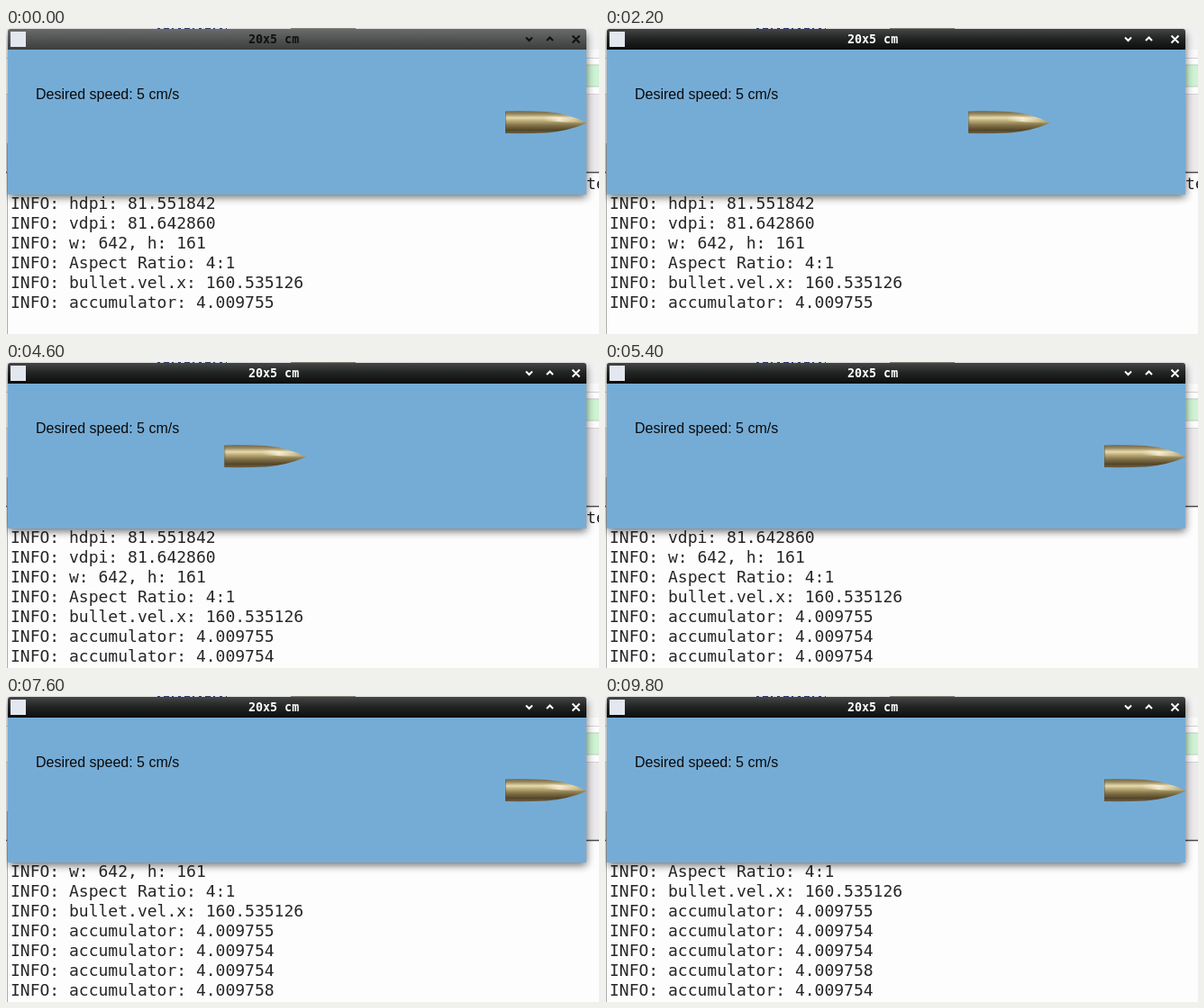
Recreate the animation shown at these times as an HTML page. Size 658 px wide and 340 px high, loop 10 s.

```html
<!DOCTYPE html>
<html lang="en">
<head>
<meta charset="utf-8">
<title>20x5 cm</title>
<style>
  html, body { margin: 0; width: 100%; height: 100%; overflow: hidden; background: #fdfdfd; }
  svg { display: block; width: 658px; height: 340px; }
  text { white-space: pre; }
  .term { font: 18px "DejaVu Sans Mono", monospace; fill: #262626; }
  .label { font: 16px "Liberation Sans", Arial, sans-serif; fill: #0a0a0a; }
  .title { font: bold 13.33px "DejaVu Sans Mono", monospace; }
</style>
</head>
<body>
<svg viewBox="0 0 658 340">
  <defs>
    <linearGradient id="active" x2="0" y2="1">
      <stop offset="0" stop-color="#454747"/>
      <stop offset=".45" stop-color="#242626"/>
      <stop offset="1" stop-color="#0b0c0c"/>
    </linearGradient>
    <linearGradient id="idle" x2="0" y2="1">
      <stop offset="0" stop-color="#6a6b6b"/>
      <stop offset=".5" stop-color="#525353"/>
      <stop offset="1" stop-color="#3c3d3d"/>
    </linearGradient>
    <linearGradient id="brass" x2="0" y2="1">
      <stop offset="0" stop-color="#6f6547"/>
      <stop offset=".14" stop-color="#9c8d61"/>
      <stop offset=".3" stop-color="#e6dbb0"/>
      <stop offset=".42" stop-color="#c2b17c"/>
      <stop offset=".62" stop-color="#85754b"/>
      <stop offset=".85" stop-color="#544628"/>
      <stop offset="1" stop-color="#6b5f45"/>
    </linearGradient>
    <linearGradient id="shine">
      <stop offset="0" stop-color="#fff8dc" stop-opacity="0"/>
      <stop offset=".4" stop-color="#fff8e4" stop-opacity=".75"/>
      <stop offset="1" stop-color="#d8ccb0" stop-opacity=".2"/>
    </linearGradient>
    <filter id="blur" x="-10%" y="-20%" width="120%" height="140%">
      <feGaussianBlur stdDeviation="5"/>
    </filter>
    <clipPath id="view"><rect x="2" y="24" width="642" height="161"/></clipPath>
  </defs>

  <!-- desktop behind the window -->
  <rect width="658" height="340" fill="#fdfdfd"/>
  <rect width="658" height="24" fill="#f1f1f2"/>
  <rect y="24" width="658" height="9" fill="#f9f9f9"/>
  <path d="M0 33.5H658M0 73.5H658" stroke="#d5d1d5"/>
  <rect x="600" y="41" width="70" height="24" fill="#cdf3d3" stroke="#bccfc0"/>
  <rect y="74" width="658" height="86" fill="#ebe9ec"/>
  <path d="M0 160.5H658" stroke="#4c4c4c" stroke-width="1.5"/>
  <path d="M1.5 128V340" stroke="#a9a9a9"/>
  <path d="M168 .8H245" stroke="#35407c" stroke-width="1.6" stroke-dasharray="3 4 6 3 2 5"/>
  <path d="M316 .8H388" stroke="#8b8d83" stroke-width="1.4"/>
  <g id="lines" class="term"></g>

  <!-- window -->
  <rect x="3" y="6" width="641" height="182" fill="#000" opacity=".58" filter="url(#blur)"/>
  <rect x="2" y="24" width="642" height="161" fill="#75acd6"/>
  <path id="bar" d="M2 24V4Q2 1 5 1H641Q644 1 644 4V24Z"/>
  <rect x="5" y="4" width="17" height="17" fill="#e3e7ef"/>
  <text id="title" class="title" x="269" y="17">20x5 cm</text>
  <path id="buttons" d="M577 10.5l3.5 3.5l3.5-3.5M600 14l3.5-3.5l3.5 3.5M628.5 8.5l8 8M636.5 8.5l-8 8" fill="none" stroke-width="2"/>
  <g clip-path="url(#view)">
    <text class="label" x="33" y="79">Desired speed: 5 cm/s</text>
    <g id="bullet">
      <path d="M0 92.5Q24 92 46 93Q70 95 90.5 105.5Q70 114.5 46 116.5Q24 117.5 0 117Z" fill="url(#brass)"/>
      <path d="M42 98Q66 97.5 88 105Q66 105 42 103Z" fill="url(#shine)"/>
      <path d="M.5 93V116.5" stroke="#5d5135" stroke-opacity=".5"/>
    </g>
  </g>
</svg>
<script>
  const LOOP = 10000, STEP = 200;
  const LENGTH = 90, START = 2 - LENGTH, REST = 554;
  const SPEED = 160.535126 * 2.5 / 1000; // px per ms
  const FOCUS = 600, ROWS = 7;
  const RUNS = [
    { at: 976, log: '4.009754' },
    { at: 3777, log: '4.009754' },
    { at: 5839, log: '4.009758' },
    { at: 8020, log: '4.009754' }
  ];
  const OUTPUT = ['hdpi: 81.551842', 'vdpi: 81.642860', 'w: 642, h: 161',
    'Aspect Ratio: 4:1', 'bullet.vel.x: 160.535126', 'accumulator: 4.009755'];

  const $ = id => document.getElementById(id);
  const span = (REST - START) / SPEED;

  function addLine(x, y, str) {
    const el = document.createElementNS('http://www.w3.org/2000/svg', 'text');
    el.setAttribute('x', x);
    el.setAttribute('y', y);
    el.textContent = str;
    $('lines').append(el);
    return el;
  }
  const tail = addLine(644, 179, 'te');
  const rows = Array.from({ length: ROWS }, (_, i) => addLine(5, 201 + i * 22, ''));

  function draw(ms) {
    const t = Math.floor(ms % LOOP / STEP) * STEP;

    const run = RUNS.find(r => t >= r.at && t < r.at + span);
    const x = run ? START + (t - run.at) * SPEED : REST;
    $('bullet').setAttribute('transform', `translate(${x.toFixed(2)} 0)`);

    const done = RUNS.filter(r => t >= r.at + span);
    const log = OUTPUT.concat(done.map(r => 'accumulator: ' + r.log));
    const top = Math.max(0, log.length - ROWS);
    rows.forEach((row, i) => {
      const line = log[top + i];
      row.textContent = line ? 'INFO: ' + line : '';
    });
    tail.setAttribute('visibility', top ? 'hidden' : 'visible');

    const focused = t >= FOCUS;
    const ink = focused ? '#fff' : '#101010';
    $('bar').setAttribute('fill', focused ? 'url(#active)' : 'url(#idle)');
    $('title').setAttribute('fill', ink);
    $('buttons').setAttribute('stroke', ink);
  }

  const begin = performance.now();
  function tick() {
    draw(performance.now() - begin);
    requestAnimationFrame(tick);
  }
  draw(0);
  requestAnimationFrame(tick);
</script>
</body>
</html>
```
